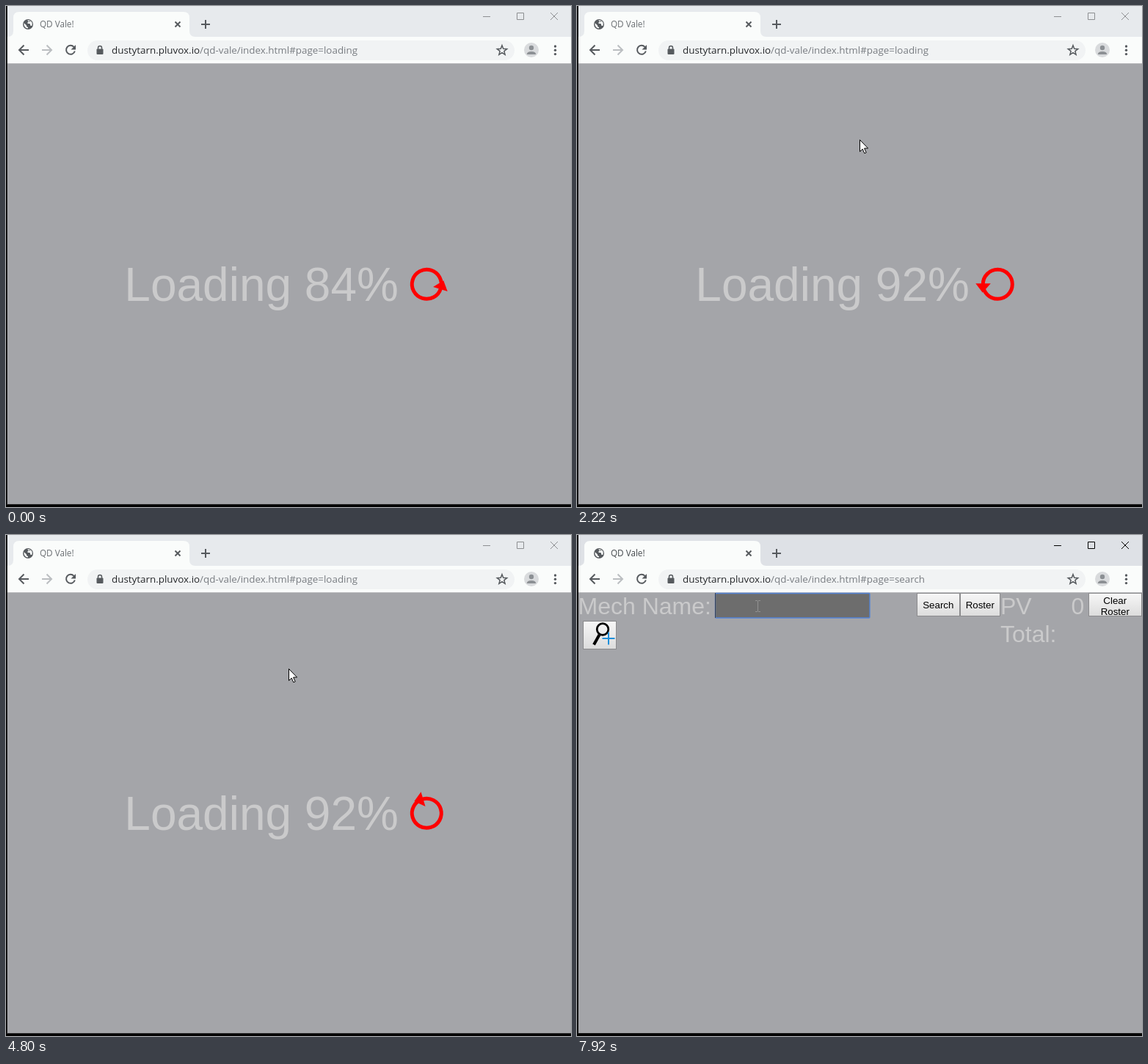
An HTML page that plays this animation: 770 by 683 pixels, repeating every 8000 ms.

```html
<!DOCTYPE html>
<html lang="en">
<head>
<meta charset="utf-8">
<title>Loading page</title>
<style>
  html, body { margin: 0; width: 100%; height: 100%; overflow: hidden; background: #000; }
  svg { display: block; width: 770px; height: 683px; }
  text { white-space: pre; }
  .ui { font-family: "Open Sans", "Noto Sans", sans-serif; }
  .page { font-family: "Liberation Sans", Arial, sans-serif; }
  .big { font-size: 64px; fill: #cacacb; }
  .label { font-size: 32px; fill: #cacacb; }
  .btn { font-size: 13.33px; text-anchor: middle; fill: #000; }
  .btn rect { fill: url(#face); stroke: #8b8b8d; }
  .line { fill: none; stroke: #565a5e; stroke-width: 2; }
  .edge { fill: #2b2b2d; }
  .strip { fill: #e7eaed; }
  .title { fill: #6b6f73; font-size: 11.7px; }
  .controls { fill: none; stroke: #8d8f91; }
  .active .edge { fill: #171717; }
  .active .strip { fill: #dee1e6; }
  .active .title { fill: #45494d; }
  .active .controls { stroke: #000; }
  #beam { mix-blend-mode: difference; }
</style>
</head>
<body>
<svg id="stage" viewBox="0 0 770 683">
  <defs>
    <linearGradient id="face" x2="0" y2="1">
      <stop stop-color="#f7f7f7"/><stop offset="1" stop-color="#dcdcdc"/>
    </linearGradient>
  </defs>
  <rect width="770" height="683"/>
  <rect class="edge" x="1" width="769" height="680"/>
  <rect class="strip" x="2" width="768" height="43"/>
  <rect x="2" y="78" width="768" height="601" fill="#a4a5a9"/>

  <!-- browser frame -->
  <g class="ui">
    <path d="M2 42Q10 42 10 34V16Q10 8 18 8H242Q250 8 250 16V34Q250 42 258 42H770V78H2Z" fill="#fafcfb"/>
    <path d="M2 78.5H770" stroke="#b9babd"/>
    <circle cx="30" cy="25" r="7" fill="#565a5e"/>
    <path d="M24.6 23.2L28 26.6V28L30 29V30.6A6 6 0 0 1 24.6 23.2ZM29 19.6H32.5L31.5 22H29.5V24H32.5L33.5 27H35.2A6 6 0 0 0 32.8 19.8V21.8H31" fill="#fafcfb"/>
    <text class="title" x="46" y="29">QD Vale!</text>
    <path class="line" d="M230.5 21.5L237.5 28.5M237.5 21.5L230.5 28.5" stroke-width="1.7"/>
    <path class="line" d="M266 25H278M272 19V31"/>
    <path class="controls" d="M650 14.5H660M696.5 9.5H705.5V18.5H696.5ZM742 9L752 19M752 9L742 19"/>

    <path class="line" d="M31 60H18M24.5 53.5L18 60L24.5 66.5"/>
    <path class="line" d="M49 60H62M55.5 53.5L62 60L55.5 66.5" style="stroke:#bbbec1"/>
    <path class="line" d="M92.5 55.8A6 6 0 1 0 93.8 61.5"/>
    <path d="M95 53V59.5H88.5Z" fill="#565a5e"/>
    <rect x="111" y="47" width="582" height="27" rx="13.5" fill="#f1f3f4"/>
    <rect x="123.5" y="58.5" width="9" height="7.5" rx="1" fill="#565a5e"/>
    <path class="line" d="M125.5 59V57A2.5 2.5 0 0 1 130.5 57V59" style="stroke-width:1.5"/>
    <text x="144" y="65" font-size="13.4" fill="#797d82"><tspan fill="#25272a">dustytarn.pluvox.io</tspan>/qd-vale/index.html#page=<tspan id="route">loading</tspan></text>
    <path id="star" class="line" style="stroke-width:1.5"/>
    <circle cx="716" cy="60" r="10" fill="#d9dbdd"/>
    <g fill="#8c9094"><circle cx="716" cy="57" r="3.2"/><path d="M709.8 66Q710 62 716 62T722.2 66Z"/></g>
    <g fill="#565a5e"><circle cx="748.5" cy="55" r="1.7"/><circle cx="748.5" cy="60.3" r="1.7"/><circle cx="748.5" cy="65.6" r="1.7"/></g>
  </g>

  <g id="loading" class="page">
    <text class="big" x="161.3" y="402">Loading <tspan id="percent">84</tspan>%</text>
    <g id="spinner" fill="#f00">
      <circle r="20" fill="none" stroke="#f00" stroke-width="5"/>
      <path d="M9.5 1H30L20.5 -11.5Z"/>
    </g>
  </g>

  <g id="search" class="page">
    <g class="label">
      <text x="1.5" y="108">Mech Name:</text>
      <text x="577" y="108">PV</text>
      <text x="577" y="145.5">Total:</text>
      <text x="673.5" y="108">0</text>
    </g>
    <rect x="188" y="79" width="211" height="34" fill="#6d6d6d"/>
    <rect id="focus" x="188.5" y="79.5" width="210.5" height="33.5" rx="1" fill="none" stroke="#5484d8" stroke-width="1.3"/>
    <rect id="caret" x="188" y="79" width="1" height="34" fill="#33435f"/>
    <g class="btn">
      <rect x="463.5" y="79.5" width="58" height="31"/><text x="492.3" y="100">Search</text>
      <rect x="522.5" y="79.5" width="54" height="31"/><text x="549.3" y="100">Roster</text>
      <rect x="697.5" y="79.5" width="72" height="31"/><text x="733.3" y="94">Clear</text><text x="733.3" y="109">Roster</text>
      <rect x="8.5" y="117.5" width="45" height="38"/>
    </g>
    <g fill="none">
      <circle cx="35" cy="128.5" r="7.8" stroke="#000" stroke-width="2.7"/>
      <path d="M30.5 136L23 149.5" stroke="#000" stroke-width="4"/>
      <path d="M34.5 141H51.5M43 132.5V149.5" stroke="#1f8fda" stroke-width="2"/>
    </g>
  </g>

  <path id="arrow" d="M.5 .5V16.5L4.2 13L6.8 18.8L9.2 17.8L6.6 12H11.6Z" fill="#fff" stroke="#000"/>
  <path id="beam" d="M-3 -7.5H0M1 -7.5H4M.5 -7V7M-3 7.5H0M1 7.5H4" fill="none" stroke="#fff"/>
</svg>
<script>
const LOOP = 8000, STEP = 60;
const PAGE_AT = 5640, CLICK_AT = 6960, BLINK = 480;
// time, x, y of the mouse pointer
const route = [
  [720, 777, 70], [840, 723, 98], [1200, 550, 139], [1500, 430, 166], [1680, 385, 182],
  [6180, 385, 182], [6600, 261, 107], [6840, 246, 97]
];
const el = id => document.getElementById(id);
const show = (id, on) => el(id).style.display = on ? "" : "none";
const place = (id, x, y, turn = 0) =>
  el(id).setAttribute("transform", `translate(${x} ${y}) rotate(${turn})`);

function pointer(t) {
  const i = route.findIndex(p => p[0] > t);
  if (i < 0) return route[route.length - 1].slice(1);
  if (i === 0) return [800, 70];
  const a = route[i - 1], b = route[i], k = (t - a[0]) / (b[0] - a[0]);
  return [1, 2].map(n => Math.round(a[n] + (b[n] - a[n]) * k));
}

function starPath() {
  const points = [];
  for (let i = 0; i < 10; i++) {
    const r = i % 2 ? 3 : 7, a = (i / 5 - .5) * Math.PI;
    points.push([676 + r * Math.cos(a), 60.7 + r * Math.sin(a)]);
  }
  return "M" + points.join("L") + "Z";
}

function draw(now) {
  const t = Math.floor(now % LOOP / STEP) * STEP;
  const loaded = t >= PAGE_AT, active = t >= CLICK_AT;
  show("loading", !loaded);
  show("search", loaded);
  el("route").textContent = loaded ? "search" : "loading";
  el("percent").textContent = t < 1200 ? 84 : 92;
  place("spinner", 573.3, 379.3, 17 - .2508 * t);

  el("stage").classList.toggle("active", active);
  show("focus", active);
  show("caret", active && Math.floor((t - CLICK_AT) / BLINK) % 2 === 0);

  const [x, y] = pointer(t);
  const typing = loaded && x > 188 && x < 399 && y < 113;
  show("arrow", !typing);
  show("beam", typing);
  place(typing ? "beam" : "arrow", x, y);
}

el("star").setAttribute("d", starPath());
const start = performance.now();
function tick() {
  draw(performance.now() - start);
  requestAnimationFrame(tick);
}
tick();
</script>
</body>
</html>
```
